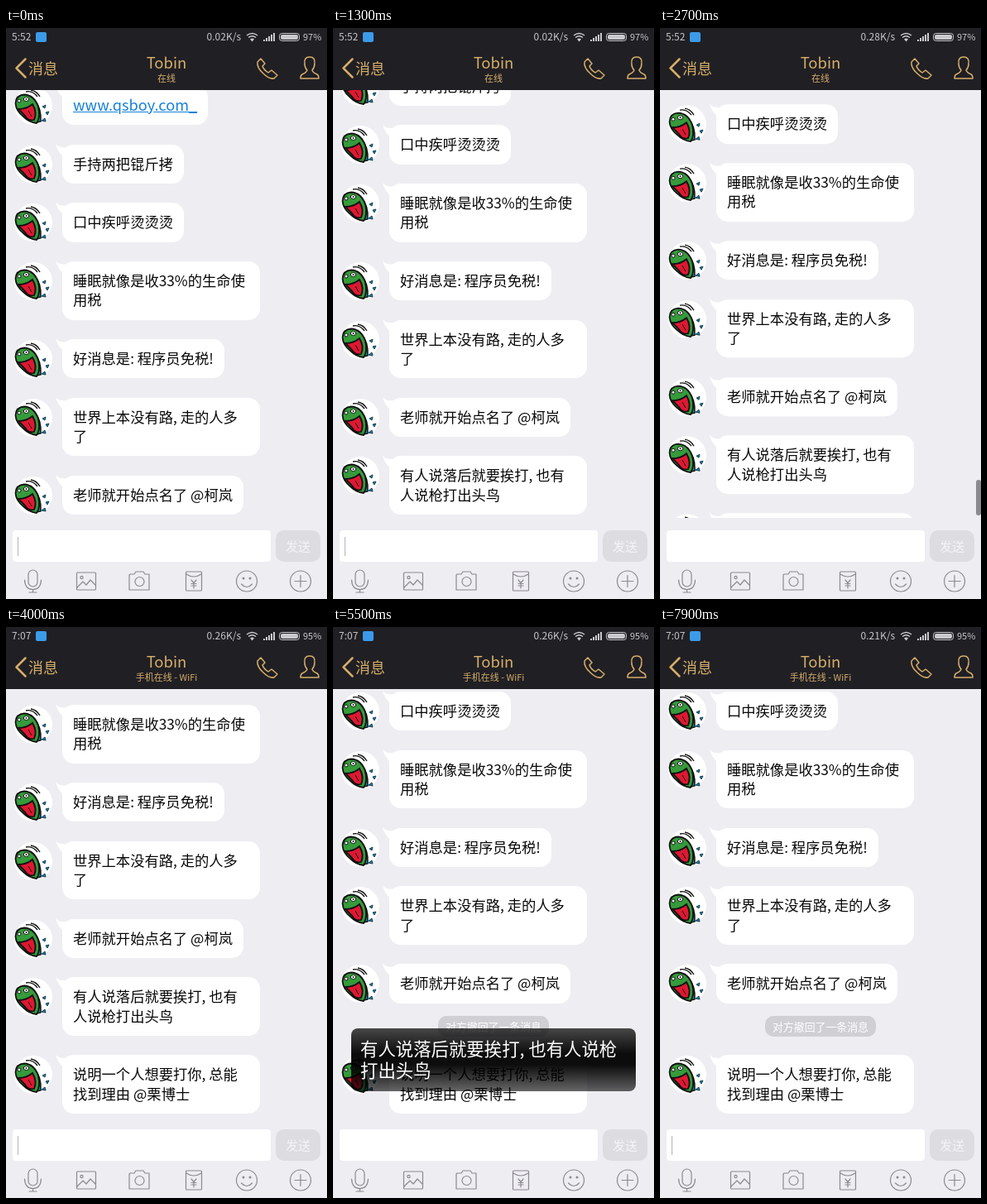
Write an HTML page that moves like this. It is 388 px wide and 690 px high and loops after 8000 ms.

```html
<!DOCTYPE html>
<html lang="zh-CN">
<head>
<meta charset="utf-8">
<title>Chat</title>
<style>
html, body { margin: 0; width: 100%; height: 100%; overflow: hidden; background: #eeedf2; }
body { font-family: "Noto Sans CJK SC", "Noto Sans CJK", "Noto Sans", sans-serif; }
#stage { position: relative; width: 388px; height: 690px; overflow: hidden; background: #eeedf2; }
#stage > * { position: absolute; }
#chat { left: 0; top: 75px; width: 388px; height: 517px; overflow: hidden; }
#log { position: absolute; left: 0; right: 0; bottom: -19.4px; display: flex; flex-direction: column; align-items: flex-start; }
.row { position: relative; margin: 0 0 23.4px 68px; }
.row svg { position: absolute; left: -58px; top: 1px; }
.bubble { position: relative; box-sizing: border-box; max-width: 239px; padding: 11px 13px 13px; border-radius: 14px;
  background: #fff; color: #080808; font-size: 17.3px; line-height: 23.3px; }
.bubble::before { content: ""; position: absolute; left: -8px; top: -1px; width: 16px; height: 15px;
  background: #fff; clip-path: path("M0 0Q4 6 16 4L9 15Q2 9 0 0Z"); }
.link { color: #1580d8; text-decoration: underline; font-size: 18.2px; }
#notice { align-self: center; margin: -7.6px 0 22px; width: 134px; height: 25px; border-radius: 10px;
  background: #d0cfd4; color: #fff; font-size: 12.9px; line-height: 25px; text-align: center; white-space: nowrap; }
#scrollbar { left: 382px; top: 546px; width: 6px; height: 43px; border-radius: 3px; background: #8b8a8e; }
#toast { left: 22px; top: 485px; width: 333px; height: 65px; padding: 11px 0 0 11px; border-radius: 8px;
  background: linear-gradient(rgba(0,0,0,.7), rgba(0,0,0,.95) 40%, rgba(0,0,0,.95) 58%, rgba(0,0,0,.6));
  color: #fff; font-size: 21.4px; line-height: 26px; white-space: pre; }
#ui { left: 0; top: 0; }
</style>
</head>
<body>
<div id="stage">
  <div id="chat"><div id="log"></div></div>
  <div id="scrollbar"></div>
  <svg id="ui" width="388" height="690" fill="none">
    <defs>
      <symbol id="avatar" viewBox="0 0 46 46">
        <circle cx="23" cy="23" r="23" fill="#fff"/>
        <path d="M24 16Q33 25 32 42L27 43z" fill="#168b91" stroke="#111" stroke-width="1.500"/>
        <path d="M1.500 20Q2 10 12 9.500Q24 10 29 24Q32 37 27 44Q18 43 11 36Q2 29 1.500 20z" fill="#359b3b" stroke="#111" stroke-width="1.800"/>
        <path d="M5 27Q15 27 22 21Q28 31 24 40Q17 42 13 35z" fill="#df1832" stroke="#111" stroke-width="1.800"/>
        <path d="M17 29L21 36" stroke="#111"/>
        <g fill="#fff" stroke="#111"><circle cx="6" cy="17" r="2"/><ellipse cx="14.500" cy="15" rx="3.200" ry="2.500"/></g>
        <circle cx="14.500" cy="15" r="1" fill="#111"/>
        <path d="M14 6Q22 4 28 12M20 4Q27 5 31 12" stroke="#111" stroke-width="1.300"/>
        <path d="M34 24l4-2-1 4zM38 31l4-1-2 4zM33 41l4-3 1 4z" fill="#1780ad" stroke="#174050"/>
      </symbol>
    </defs>

    <path d="M0 0H388V75H0z" fill="#201f24"/>
    <g fill="#c9c8cc" font-size="12">
      <text id="clock" x="7" y="15"></text>
      <text id="speed" x="284" y="15" text-anchor="end"></text>
      <text id="power" x="359" y="15" font-size="11"></text>
      <rect x="36" y="5" width="13" height="12" rx="2" fill="#3b9be8"/>
      <path d="M295 13.500L297.500 16.500L300 13.500Q297.500 11.500 295 13.500z"/>
      <path d="M311 16v-2h2v2zM314 16v-4h2v4zM317 16v-6h2v6zM320 16v-8h2v8zM323 16V6h2v10z"/>
      <rect x="332" y="8" width="21" height="6" rx="2"/>
    </g>
    <g stroke="#c9c8cc">
      <path d="M291 9Q297.500 4 304 9M293 11.500Q297.500 8 302 11.500" stroke-width="1.500"/>
      <rect x="330.500" y="6.500" width="24" height="9" rx="3"/>
    </g>
    <g stroke="#d5ae69" stroke-width="1.500" stroke-linejoin="round" stroke-linecap="round">
      <path d="M23.500 37.500L12.500 48.500L23.500 59.500" stroke-width="2.500"/>
      <path d="M308 37L304 41Q303 48 311 55Q318 62 324 61L328 57L321 51L317 54Q311 50 310 46L313 43z"/>
      <path d="M367 35Q360 35 361 43Q361 48 364 51Q363 54 358 56Q356 57 356 61H378Q378 57 376 56Q371 54 370 51Q373 48 373 43Q374 35 367 35z"/>
    </g>
    <g fill="#d5ae69">
      <text x="27" y="55.500" font-size="18">消息</text>
      <g text-anchor="middle">
        <text x="194" y="49" font-size="18.500">Tobin</text>
        <text id="presence" x="194" y="65" font-size="11"></text>
      </g>
    </g>

    <path d="M0 592H382V690H0z" fill="#eeedf2"/>
    <rect x="8" y="607" width="312" height="38" rx="4" fill="#fff"/>
    <path id="cursor" d="M14.500 615V638" stroke="#b5b4b8"/>
    <rect x="326" y="607" width="54" height="38" rx="10" fill="#dddce1"/>
    <text x="353" y="631.500" font-size="15" fill="#f5f4f7" text-anchor="middle">发送</text>
    <g stroke="#8b8a8f" stroke-width="1.200" stroke-linejoin="round" stroke-linecap="round">
      <rect x="27" y="655" width="11" height="20" rx="5.500"/>
      <path d="M22.500 667Q23 678.500 32.500 678.500T42.500 667M32.500 679V682M28 682H37"/>
      <rect x="85.500" y="658" width="23" height="21" rx="1"/>
      <circle cx="91.500" cy="664" r="1.600"/>
      <path d="M86 676L93 669L97 673L102 667L108 673"/>
      <path d="M150 660H155L157 657H166L168 660H173V679H149V661z"/>
      <circle cx="161.500" cy="669" r="5.500"/>
      <rect x="217.500" y="657" width="19" height="23" rx="1"/>
      <path d="M218 660Q227 666 236 660M224 667L227 670.500L230 667M227 670.500V677M224 671.500H230M224 674H230"/>
      <circle cx="291" cy="668.500" r="12.500"/>
      <path d="M284.500 672Q291 679 297.500 672"/>
      <circle cx="356" cy="668.500" r="12.500"/>
      <path d="M349 668.500H363M356 661.500V675.500"/>
    </g>
    <g fill="#8b8a8f"><circle cx="287" cy="665" r="1.500"/><circle cx="295" cy="665" r="1.500"/></g>
  </svg>
  <div id="toast">有人说落后就要挨打, 也有人说枪
打出头鸟</div>
</div>
<script>
const LOOP = 8000, SCROLL_MS = 300, MESSAGE_STEP = 94;
const ARRIVALS = [914, 2600];
const SESSION_CUT = 4000, RECALL = 5100, TOAST_IN = 5200, TOAST_OUT = 7300, FADE = 200;
const messages = [
  "www.qsboy.com_",
  "手持两把锟斤拷",
  "口中疾呼烫烫烫",
  "睡眠就像是收33%的生命使用税",
  "好消息是: 程序员免税!",
  "世界上本没有路, 走的人多了",
  "老师就开始点名了 @柯岚",
  "有人说落后就要挨打, 也有人说枪打出头鸟",
  "说明一个人想要打你, 总能找到理由 @栗博士"
];

const $ = id => document.getElementById(id);
const clamp = x => Math.max(0, Math.min(1, x));
const smooth = x => x * x * (3 - 2 * x);
const show = (el, on) => { el.style.display = on ? "" : "none"; };
const setText = (id, text) => { if ($(id).textContent !== text) $(id).textContent = text; };

const rows = messages.map((text, i) => {
  const row = document.createElement("div");
  row.className = "row";
  row.innerHTML = '<svg width="46" height="46" fill="none"><use href="#avatar"/></svg><div class="bubble"></div>';
  const bubble = row.lastChild;
  bubble.textContent = text;
  if (i === 0) bubble.classList.add("link");
  $("log").append(row);
  return row;
});
const [recalled, latest] = rows.slice(-2);
const notice = document.createElement("div");
notice.id = "notice";
notice.textContent = "对方撤回了一条消息";
latest.before(notice);

function render(t) {
  const later = t >= SESSION_CUT;
  show(recalled, t >= ARRIVALS[0] && t < RECALL);
  show(latest, t >= ARRIVALS[1]);
  show(notice, t >= RECALL);

  const arrival = ARRIVALS.findLast(start => t >= start);
  const remaining = arrival === undefined ? 0 : 1 - smooth(clamp((t - arrival) / SCROLL_MS));
  $("log").style.transform = `translateY(${remaining * MESSAGE_STEP}px)`;
  show($("scrollbar"), remaining > 0);

  setText("clock", later ? "7:07" : "5:52");
  setText("power", later ? "95%" : "97%");
  setText("presence", later ? "手机在线 - WiFi" : "在线");
  setText("speed", t < 1600 ? "0.02K/s" : !later ? "0.28K/s" : t < 6200 ? "0.26K/s" : "0.21K/s");

  const blinkOn = later ? (t - 3800) % 1000 < 500 : t % 1100 < 500;
  show($("cursor"), blinkOn);
  $("toast").style.opacity = Math.min(clamp((t - TOAST_IN) / FADE), clamp((TOAST_OUT + FADE - t) / FADE));
}

const start = performance.now();
function tick() {
  render((performance.now() - start) % LOOP);
  requestAnimationFrame(tick);
}
tick();
</script>
</body>
</html>
```
